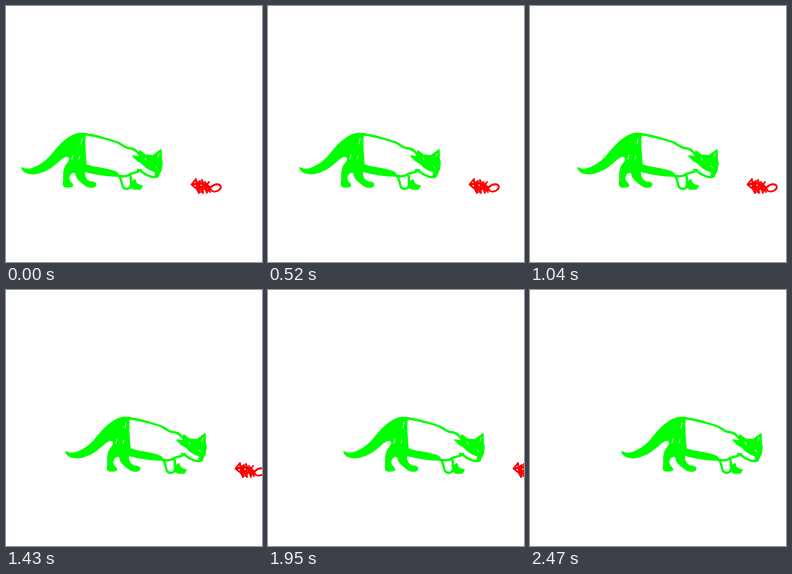
An HTML page for the animation above (2.6 s loop, 256x256 px).

```html
<!DOCTYPE html>
<html lang="en">
<head>
<meta charset="utf-8">
<title>Cat and mouse</title>
<style>
  html, body { margin: 0; width: 100%; height: 100%; overflow: hidden; background: #fff; }
  svg { display: block; width: 100vw; height: 100vh; }
  path { stroke-linecap: round; stroke-linejoin: round; }
  .fill { fill: #0f0; stroke: #0f0; stroke-width: 1.6; }
  .line { fill: none; stroke: #0f0; stroke-width: 2.3; }
  .gap { fill: none; stroke: #fff; stroke-width: .8; }
  .mouse { fill: none; stroke: #f00; stroke-width: 1.8; }
</style>
</head>
<body>
<svg viewBox="0 0 256 256">
  <g id="walkers">
    <!-- tail, haunch and hind legs -->
    <path class="fill" d="M16 162C22 166 34 161 43 152C51 143 61 129 74 127.500L79 128.500
      C78 139 79 150 80 159C90 163 102 162 111 167L113 170C101 170 89 168 78 165
      C78 171 80 175 84 176C88 176 91 178 89 180C86 182 81 181 78 178
      C74 174 70 173 70 167C68 165 66 166 64 168C62 171 62 175 65 177
      C68 180 66 181 61 181C57 181 57 178 58 175C58 169 57 162 62 157
      C65 154 64 150 61 150C57 150 54 154 49 158C39 167 24 171 17 164Z"/>
    <path class="gap" d="M76 133L75 138M67 149L66 153M74 150L73 153"/>
    <!-- back, belly and front legs -->
    <path class="line" d="M74 128C88 128 96 132 109 135.500C115 137 117 141 122 142C127 142 130 144 133 148
      M112 169C116 172 115 177 117 181C119 184 123 183 125 181
      M113 170C119 171 122 170 124 168C128 166 132 167 135 164
      M124 169C126 172 124 174 125 177M132 164C136 164 137 168 141 169C145 171 149 172 152 170"/>
    <path class="fill" d="M126 176L129 174C129 178 132 179 136 180L134 183L128 183L124 180Z"/>
    <!-- head -->
    <path class="fill" d="M134 145L139 149L147 150L155 144L155 152L156 157L155 164
      L152 170L149 171L150 166L145 164L140 161L136 157L131 154L127 150L133 151Z"/>
    <path class="gap" d="M153 148L152 151M149 160L151 162M139 152L140 154"/>
    <path class="mouse" d="M190 173L185.500 178.500L191 183L193 187L194 175L191 177L197 187L196 174L201 187
      L199 176L204 186L201 178L206 185C211 187 216 183 214.500 179.500C211 177 207 179 204 182
      M186 178.500L194 177L204 181M190 174L191 181L195 184M191 179L203 185M195 186L203 176"/>
  </g>
</svg>
<script>
  const LOOP = 2600, STEP = 130, STRIDE = 4;
  const walkers = document.getElementById('walkers');
  const start = performance.now();

  function draw(now) {
    const time = Math.max(0, now - start) % LOOP;
    const x = Math.floor(time / STEP) * STRIDE;
    walkers.setAttribute('transform', `translate(${x} 0)`);
    requestAnimationFrame(draw);
  }
  draw(start);
</script>
</body>
</html>
```
